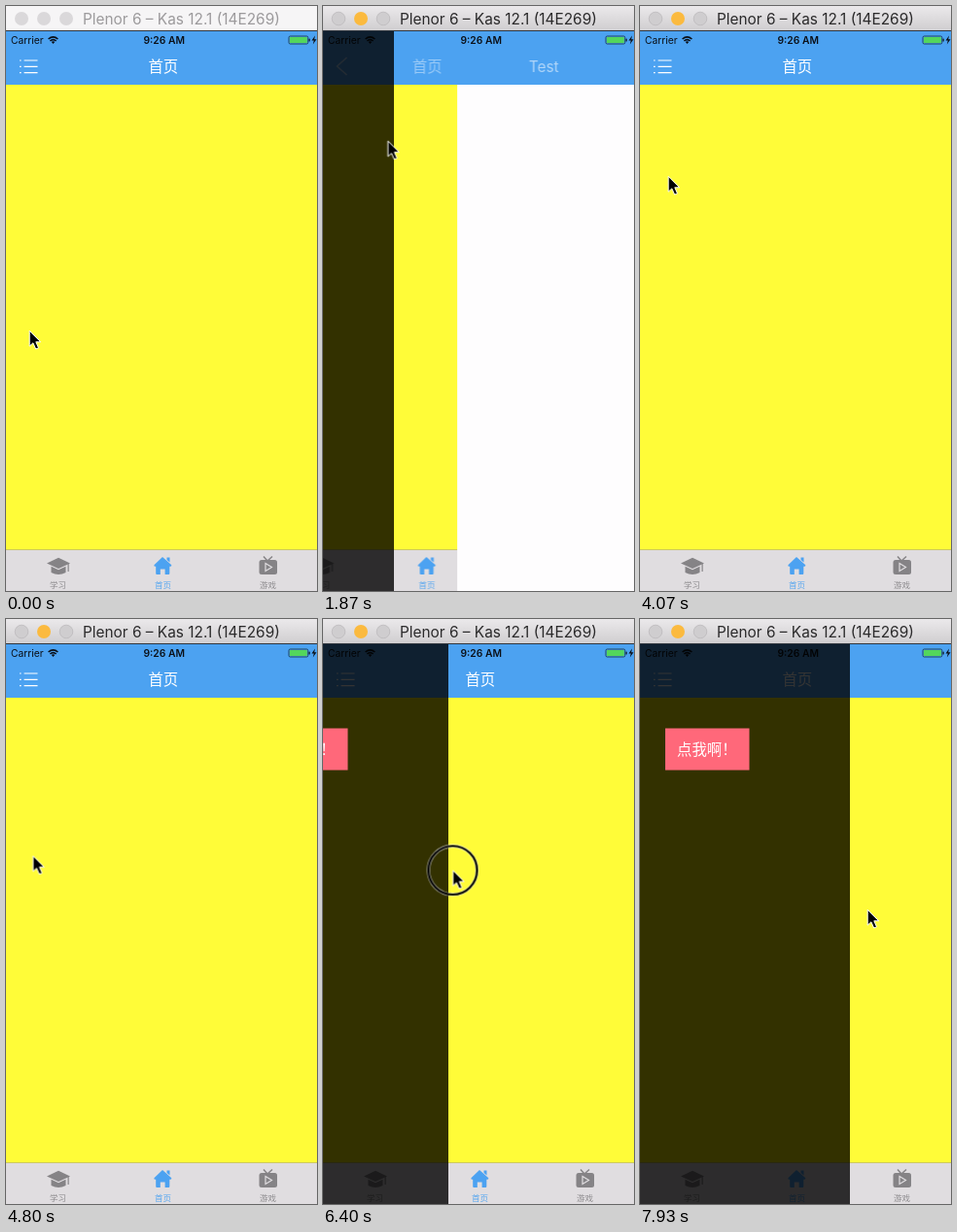
These frames come from a looping animation (320 by 602 pixels, 8000 ms). An HTML page:

```html
<!DOCTYPE html>
<html lang="zh-CN">
<head>
<meta charset="utf-8">
<title>侧滑菜单</title>
<style>
html, body { margin: 0; width: 100%; height: 100%; overflow: hidden; }
svg { display: block; width: 100%; height: 100%; }
text { font-family: Inter, "Noto Sans CJK SC", "Noto Sans CJK", sans-serif; }
.cjk { font-family: "Noto Sans CJK SC", "Noto Sans CJK", sans-serif; font-weight: 300; }
.bar { font-size: 15.4px; }
.nav { font-size: 15.4px; fill: #fff; }
.small { font-size: 10.3px; }
.tab { font-size: 8.5px; text-anchor: middle; opacity: .9; }
.grey { fill: #858386; }
.blue { fill: #4ca2f1; }
.line { fill: none; stroke: #fff; stroke-width: 1.2; }

.anim { animation: 8s ease-in-out infinite; }
.inactive { animation-name: inactive; animation-timing-function: step-end; }
.press { animation-name: press; animation-timing-function: step-end; }
.drawer { animation-name: drawer; }
.cursor { animation-name: cursor; }
.home { animation-name: home; animation-timing-function: ease-out; }
.detail { animation-name: detail; animation-timing-function: ease-out; }
.home-nav { animation-name: home-nav; animation-timing-function: ease-out; }
.detail-title { animation-name: detail-title; animation-timing-function: ease-out; }
.back { animation-name: back; animation-timing-function: ease-out; }

@keyframes inactive { 0% { opacity: 1; } 3%, 100% { opacity: 0; } }

@keyframes press {
  0% { opacity: 0; }
  3% { opacity: 1; }
  11% { opacity: 0; }
  19.75% { opacity: 1; }
  21% { opacity: 0; }
  42.5% { opacity: 1; }
  43.8% { opacity: 0; }
  63% { opacity: 1; }
  96%, 100% { opacity: 0; }
}

@keyframes cursor {
  0%, 3% { transform: translate(24px, 334px); }
  11% { transform: translate(180px, 308px); }
  13.375% { transform: translate(200px, 305px); }
  19.5%, 22.5% { transform: translate(62px, 136px); }
  30%, 36% { transform: translate(228px, 234px); }
  41.5%, 45.5% { transform: translate(31px, 66px); }
  55%, 63% { transform: translate(27.6px, 243.6px); }
  70% { transform: translate(185px, 250px); }
  80% { transform: translate(133.5px, 258.5px); }
  88.375% { transform: translate(80.5px, 276px); }
  96% { transform: translate(200px, 298px); }
  99.125%, 100% { transform: translate(234px, 299px); }
}

@keyframes drawer {
  0%, 3% { transform: translateX(-216px); }
  11% { transform: translateX(-23px); }
  13.375% { transform: translateX(-9px); }
  14.5%, 21% { transform: translateX(0); }
  25%, 63% { transform: translateX(-216px); }
  70% { transform: translateX(-23px); }
  80% { transform: translateX(-87px); }
  88.375% { transform: translateX(-153px); }
  96% { transform: translateX(-8px); }
  99.125%, 100% { transform: translateX(0); }
}

@keyframes home {
  0%, 21% { transform: translateX(0); }
  27%, 44% { transform: translateX(-96px); }
  50%, 100% { transform: translateX(0); }
}
@keyframes detail {
  0%, 21% { transform: translateX(320px); }
  27%, 44% { transform: translateX(0); }
  50%, 100% { transform: translateX(320px); }
}
@keyframes home-nav {
  0%, 21% { transform: translateX(0); opacity: 1; }
  27%, 44% { transform: translateX(-96px); opacity: 0; }
  50%, 100% { transform: translateX(0); opacity: 1; }
}
@keyframes detail-title {
  0%, 21% { transform: translateX(150px); opacity: 0; }
  27%, 44% { transform: translateX(0); opacity: 1; }
  50%, 100% { transform: translateX(150px); opacity: 0; }
}
@keyframes back {
  0%, 21% { opacity: 0; }
  27%, 44% { opacity: 1; }
  50%, 100% { opacity: 0; }
}
</style>
</head>
<body>
<svg viewBox="0 0 320 602" preserveAspectRatio="none">
  <defs>
    <linearGradient id="chrome" x2="0" y2="1">
      <stop stop-color="#ebe9eb"/>
      <stop offset="1" stop-color="#d0ced0"/>
    </linearGradient>
  </defs>

  <g class="anim home">
    <rect y="81" width="320" height="478" fill="#fffc38"/>
    <rect y="559" width="320" height="1" fill="#cdc860"/>
    <rect y="560" width="320" height="42" fill="#e0dde0"/>
    <g class="grey">
      <path d="M42 573.5 L54 567.8 L66 573.5 L54 579 Z"/>
      <path d="M46.5 576.8 L54 580.3 L61.5 576.8 V583 Q54 587 46.5 583 Z"/>
      <path d="M63.5 574 H64.7 V582 H63.5 Z"/>
      <text class="tab cjk" x="53.5" y="599.3">学习</text>
    </g>
    <g class="blue">
      <path d="M161 567 L170.3 575.2 Q170.5 577.2 168.3 576.8 V584 Q168.3 585 167.3 585 H163.6 V579.5 H158.8 V585 H155.2 Q154.2 585 154.2 584 V576.8 Q152 577.2 152.4 575.2 Z"/>
      <path d="M165.5 567.5 H168.5 V572.6 L165.5 570 Z"/>
      <text class="tab cjk" x="161.5" y="599.3">首页</text>
    </g>
    <g class="grey">
      <rect x="260.5" y="570" width="18.5" height="15" rx="2.5"/>
      <path d="M265 566.5 L269 571 L274 566.5" fill="none" stroke="#858386" stroke-width="1.5"/>
      <path d="M267 573.5 L273.5 577.5 L267 581.5 Z" fill="none" stroke="#e0dde0" stroke-width="1.2"/>
      <text class="tab cjk" x="269.5" y="599.3">游戏</text>
    </g>
  </g>

  <rect class="anim detail" y="81" width="320" height="521" fill="#fefdfe"/>

  <rect y="26" width="320" height="55" fill="#4ca2f1"/>
  <g class="anim home-nav">
    <path class="line" d="M14 56 h1.6 m3 0 H32.5 M14 62.3 h1.6 m3 0 H32.5 M14 68.6 h1.6 m3 0 H32.5"/>
    <text class="nav cjk" x="146.4" y="68">首页</text>
  </g>
  <path class="anim back line" d="M24.5 53 L14.5 62 L24.5 71" style="stroke-width:1.5"/>
  <text class="anim detail-title nav" x="147" y="68">Test</text>

  <g fill="#0b1018">
    <text class="small" x="5" y="39">Carrier</text>
    <text class="small" x="141.5" y="39" font-weight="600">9:26 AM</text>
    <path d="M43.6 34 Q48.5 29.6 53.4 34 M45.4 36 Q48.5 33.2 51.6 36" fill="none" stroke="#0b1018" stroke-width="1.6"/>
    <path d="M46.8 37 Q48.5 35.6 50.2 37 L48.5 39 Z"/>
    <rect x="291" y="31" width="19.8" height="8" rx="1.5" fill="none" stroke="#17303c" stroke-width=".8"/>
    <rect x="292" y="32" width="17.8" height="6" rx=".6" fill="#53d65c"/>
    <rect x="311.5" y="33.5" width="1.2" height="3" rx=".6"/>
    <path d="M318 30.5 L314.5 35.5 H316.8 L315.8 39.5 L319.5 34.2 H317.2 Z"/>
  </g>

  <g class="anim drawer">
    <path d="M0 26 H216 V602 H0 Z" fill="#000" fill-opacity=".8"/>
    <rect y="81" width="216" height="478" fill="#333100"/>
    <rect x="26" y="112.5" width="86.5" height="43" fill="#ff687a"/>
    <text class="nav cjk" x="38" y="140">点我啊！</text>
  </g>

  <rect width="320" height="25" fill="url(#chrome)"/>
  <g fill="#cfcdcf" stroke="#b9b7b9" stroke-width=".7">
    <circle cx="16" cy="13" r="6.8"/>
    <circle cx="39" cy="13" r="7" fill="#fbba3f" stroke="none"/>
    <circle cx="62" cy="13" r="6.8"/>
  </g>
  <text class="bar" x="79" y="18.5" fill="#2b2a2b">Plenor 6 – Kas 12.1 (14E269)</text>
  <g class="anim inactive">
    <rect width="320" height="25" fill="#f6f5f6"/>
    <g fill="#dad8da">
      <circle cx="16" cy="13" r="7"/>
      <circle cx="39" cy="13" r="7"/>
      <circle cx="62" cy="13" r="7"/>
    </g>
    <text class="bar" x="79" y="18.5" fill="#9c9a9c">Plenor 6 – Kas 12.1 (14E269)</text>
  </g>
  <rect y="25" width="320" height="1" fill="#30363e"/>

  <g class="anim cursor">
    <g class="anim press" fill="none">
      <circle r="25" stroke="#fff" stroke-width="3.4" stroke-opacity=".7"/>
      <circle r="25" stroke="#000" stroke-width="2.2"/>
    </g>
    <path transform="translate(-.3 -.4)" d="M.5 .5 V16.5 L4.2 13.2 L7 19.4 L9.8 18.2 L7.1 12.1 H12 Z" fill="#000" stroke="#fff" stroke-width="1"/>
  </g>
</svg>
</body>
</html>
```
